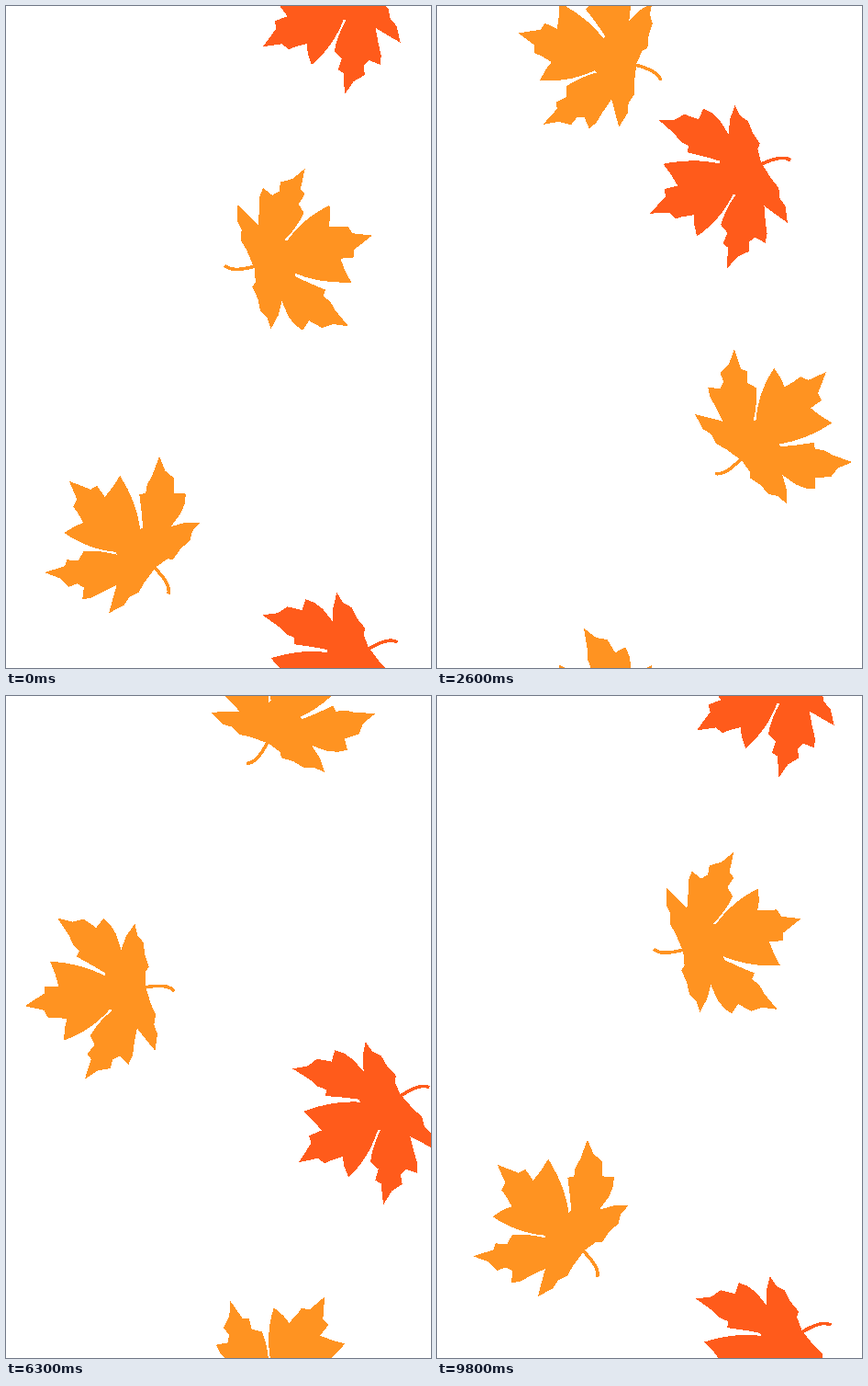
These frames come from a looping animation (463 by 720 pixels, 9900 ms). An HTML page:

```html
<!DOCTYPE html>
<html lang="en">
<head>
<meta charset="utf-8">
<title>Falling leaves</title>
<style>
  html, body { margin: 0; height: 100%; overflow: hidden; background: #fff; }
  svg { display: block; width: 100%; height: 100%; }
</style>
</head>
<body>
<svg id="stage" viewBox="0 0 463 720" shape-rendering="crispEdges">
  <defs>
    <!-- Drawn around the pivot: five lobes, then the stem -->
    <g id="leaf">
      <path d="M4-74 11-63 20-58 26-46 35-35 33-29 38-15
        51 2 60 11 62 22 69 30 73 48
        61 41 46 32 49 49 52 62 51 72 39 67 33 73 34 83 22 90 12 104
        11 81 5 77 9 65 1 57 Q4 40 14 23 L11 23 Q0 52-24 72
        L-28 59-29 49-41 52-49 55-56 49-77 52
        -62 32-64 24-50 19-58 8-68-3 Q-36-13-6-9 L-7-12 Q-20-15-43-18
        L-42-25-51-29-59-37-77-50
        -60-52-50-59-34-55-30-67-20-63-11-56 0-42 0-58Z"/>
      <path d="M37-12Q49-19 57-21T70-20" fill="none" stroke="currentColor" stroke-width="3.6"/>
    </g>
  </defs>
</svg>
<script>
const LOOP = 9900, STEP = 100, HEIGHT = 720;
const ORANGE = '#ff9321', RED = '#ff5b1b';

const sine = (mean, size, phase) => angle => mean + size * Math.sin(angle + phase);

// Each leaf falls evenly while it sways (x) and rocks (tilt, degrees) once per loop.
const leftSway = sine(138.8, 37.9, 0.13), leftDrift = sine(0, 5.4, -0.98);
const leaves = [
  { color: ORANGE, y: 577.2, x: a => leftSway(a) + leftDrift(2 * a), tilt: sine(43.5, 31.4, 1.46) },
  { color: ORANGE, y: 280.5, x: sine(327.2, 39.5, -0.42), tilt: sine(166, 28.6, 1.57) },
  { color: RED, y: 712.1, x: sine(357.9, -44.5, 0.03), tilt: sine(0.1, 5.3, -0.05) }
];

const stage = document.getElementById('stage');
for (const leaf of leaves) {
  leaf.copies = [-HEIGHT, 0, HEIGHT].map(offset => {
    const node = document.createElementNS(stage.namespaceURI, 'use');
    node.setAttribute('href', '#leaf');
    node.setAttribute('fill', leaf.color);
    node.setAttribute('color', leaf.color);
    stage.append(node);
    return { node, offset };
  });
}

function draw(ms) {
  const progress = Math.floor(ms % LOOP / STEP) * STEP / LOOP;
  const angle = 2 * Math.PI * progress;
  for (const leaf of leaves) {
    const x = leaf.x(angle), tilt = leaf.tilt(angle);
    const y = (leaf.y + HEIGHT * progress) % HEIGHT;
    for (const { node, offset } of leaf.copies)
      node.setAttribute('transform', `translate(${x} ${y + offset}) rotate(${tilt})`);
  }
}

const start = performance.now();
function tick() {
  draw(performance.now() - start);
  requestAnimationFrame(tick);
}
tick();
</script>
</body>
</html>
```
